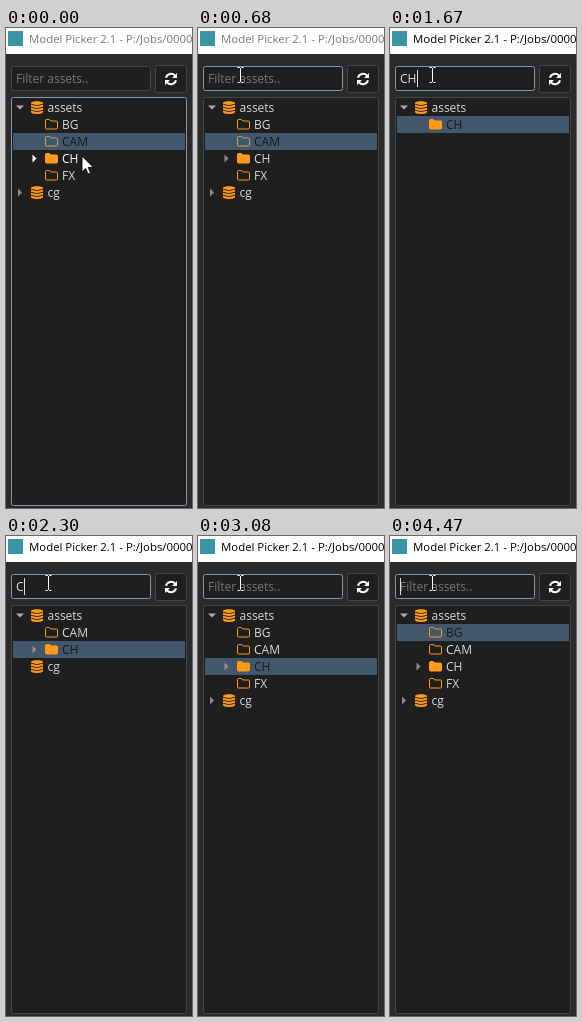
Recreate the animation shown at these times as an HTML page. Size 186 px wide and 480 px high, loop 4700 ms.

```html
<!DOCTYPE html>
<html lang="en">
<head>
<meta charset="utf-8">
<title>Filtered tree</title>
<style>
  html, body { margin: 0; width: 100%; height: 100%; overflow: hidden; background: #2b2b2b; }
  svg { display: block; width: 100vw; height: 100vh; }
  text { font: 12px "Open Sans", "Noto Sans", sans-serif; white-space: pre; }
  .title { font-size: 11.4px; }
</style>
</head>
<body>
<svg id="stage" viewBox="0 0 186 480" preserveAspectRatio="none"></svg>
<script>
const LOOP = 4700;
const ORANGE = '#ff9a17', PANEL = '#1f1f1f', EDGE = '#444', FOCUS = '#8296b3', SELECTED = '#42576c';
const ROW_TOP = 71, ROW_HEIGHT = 17;

// Each step changes only the listed properties.
const STEPS = [
  [0,    { pointer: [76, 128], title: '#7b7b7b', query: '', caret: false, selected: 'CAM', active: false }],
  [70,   { pointer: [70, 112] }],
  [150,  { pointer: [60, 84] }],
  [220,  { pointer: [50, 56] }],
  [300,  { pointer: [44, 38] }],
  [430,  { pointer: [42, 43] }],
  [680,  { pointer: [42, 47] }],
  [750,  { title: '#444', caret: true }],
  [830,  { title: '#000' }],
  [1290, { caret: false }],
  [1520, { query: 'C', caret: true, active: true }],
  [1670, { query: 'CH', selected: 'CH' }],
  [2300, { query: 'C' }],
  [2530, { query: '' }],
  [3080, { caret: false }],
  [3540, { query: 'B', caret: true, selected: 'BG' }],
  [3690, { query: 'BG' }],
  [4240, { query: 'B' }],
  [4470, { query: '' }]
];

const states = [];
STEPS.forEach(([time, change]) => states.push({ ...states.at(-1), ...change, time }));

const TREE = [
  { name: 'assets', root: true, arrow: 'down' },
  { name: 'BG' },
  { name: 'CAM' },
  { name: 'CH', solid: true, arrow: 'right' },
  { name: 'FX' },
  { name: 'cg', root: true, arrow: 'right' }
];

function visibleItems(query) {
  if (!query) return TREE;
  return TREE
    .filter(item => item.name === 'assets' || item.name.toLowerCase().startsWith(query.toLowerCase()))
    .map(item => {
      const leaf = item.name === 'cg' || query === 'CH';
      return leaf && item.arrow === 'right' ? { ...item, arrow: null } : item;
    });
}

const rect = (x, y, w, h, fill, extra = '') =>
  `<rect x="${x}" y="${y}" width="${w}" height="${h}" fill="${fill}" ${extra}/>`;
const path = (d, fill, extra = '') => `<path d="${d}" fill="${fill}" ${extra}/>`;
const text = (x, y, value, fill, extra = '') => `<text x="${x}" y="${y}" fill="${fill}" ${extra}>${value}</text>`;
const at = (x, y, content) => `<g transform="translate(${x} ${y})">${content}</g>`;
const box = (x, y, w, h, edge, radius = 2) =>
  rect(x + .5, y + .5, w - 1, h - 1, PANEL, `stroke="${edge}" rx="${radius}"`);

const database = path('M0 2C0-.4 12-.4 12 2V11C12 13.6 0 13.6 0 11Z', ORANGE) +
  [3.2, 6.2, 9.2].map(y => path(`M0 ${y}Q6 ${y + 3} 12 ${y}`, 'none', `stroke="${PANEL}" stroke-width=".9"`)).join('');

const folder = (solid, color) =>
  path('M.5 1.5Q.5.5 1.5.5H4.5L6 2H11.5Q12.5 2 12.5 3V9Q12.5 10 11.5 10H1.5Q.5 10 .5 9Z',
    solid ? color : 'none', `stroke="${color}"`);

const triangle = (direction, color) =>
  path(direction === 'down' ? 'M-4-2H4L0 2Z' : 'M-2-4L2 0L-2 4Z', color);

const refresh =
  path('M-5-1.2A5.2 5.2 0 0 1 4-3.4M5 1.2A5.2 5.2 0 0 1-4 3.4', 'none', 'stroke="#fff" stroke-width="2"') +
  path('M6-6V-1H1ZM-6 6V1H-1Z', '#fff');

const arrowPointer = path('M0 0V16L3.7 12.5L6 18L8.6 17L6.2 11.5H11.3Z', '#fff', 'stroke="#000" stroke-width=".8"');
const textPointer = path('M-3-7.5H-1L0-6.5L1-7.5H3M0-6.5V6.5M-3 7.5H-1L0 6.5L1 7.5H3', 'none', 'stroke="#fff"');

function drawItem(item, index, state, hovered) {
  const top = ROW_TOP + index * ROW_HEIGHT;
  const selected = item.name === state.selected;
  const dim = selected && !state.active;
  const textColor = selected ? '#171a1d' : hovered ? '#fff' : '#d8d8d8';
  const arrowColor = hovered ? '#fff' : item.arrow === 'down' ? '#aaa' : '#8c8c8c';
  return (selected ? rect(7, top, 172, ROW_HEIGHT, SELECTED) : '') +
    (item.arrow ? at(item.root ? 14 : 28.5, top + 8.5, triangle(item.arrow, arrowColor)) : '') +
    (item.root ? at(25, top + 2, database) : at(39, top + 3, folder(item.solid, dim ? '#c99a63' : ORANGE))) +
    text(item.root ? 41.5 : 56, top + 13, item.name, textColor);
}

function draw(state) {
  const [x, y] = state.pointer;
  const overTree = y >= 69;
  const hoverRow = overTree ? Math.floor((y - ROW_TOP) / ROW_HEIGHT) : -1;
  const caretX = [10, 18, 27][state.query.length];
  return rect(0, 0, 186, 480, '#2b2b2b') +
    rect(0, 0, 186, 26, '#fff') +
    rect(2, 3, 15, 15, '#3b94a3') +
    text(23, 15, 'Model Picker 2.1 - P:/Jobs/0000', state.title, 'class="title"') +
    box(5, 38, 140, 25, overTree ? EDGE : FOCUS) +
    text(10, 55, state.query || 'Filter assets..', state.query ? '#ddd' : '#777') +
    (state.caret ? rect(caretX, 42, 1, 17, '#ddd') : '') +
    box(149, 37, 32, 28, EDGE) +
    at(165, 51, refresh) +
    box(5, 69, 176, 409, overTree ? FOCUS : EDGE) +
    visibleItems(state.query).map((item, i) => drawItem(item, i, state, i === hoverRow)).join('') +
    rect(0, 479, 186, 1, '#30262a') +
    (overTree ? at(x, y, arrowPointer) : at(x + .5, y, textPointer));
}

const stage = document.getElementById('stage');
let shown = null;

function tick() {
  const time = performance.now() % LOOP;
  const state = states.findLast(s => s.time <= time);
  if (state !== shown) {
    stage.innerHTML = draw(state);
    shown = state;
  }
  requestAnimationFrame(tick);
}
tick();
</script>
</body>
</html>
```
